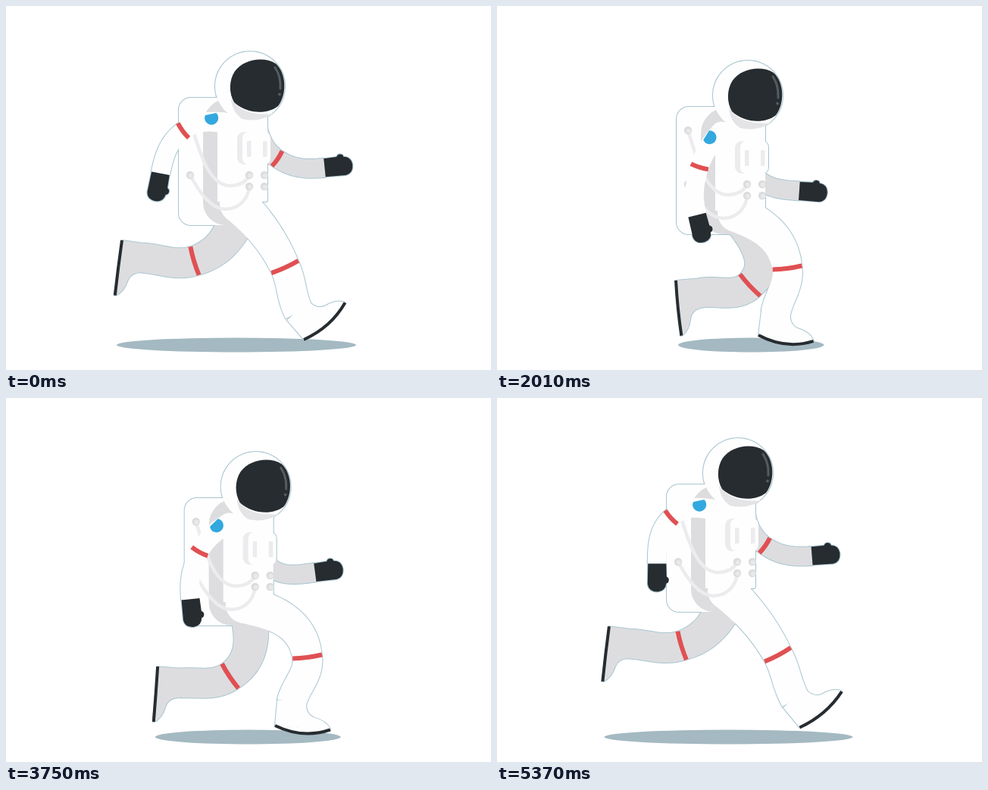
Recreate the animation shown at these times as an HTML page with a canvas. Size 640 by 480 pixels, loop 5400 ms.

```html
<!DOCTYPE html>
<html lang="en">
<head>
<meta charset="utf-8">
<title>Running astronaut</title>
<style>
html, body { margin: 0; width: 100%; height: 100%; overflow: hidden; background: #fff; }
canvas { display: block; }
</style>
</head>
<body>
<canvas id="stage" width="640" height="480"></canvas>
<script>
const ctx = document.getElementById('stage').getContext('2d');
const CYCLE = 1800, HALF = CYCLE / 2, STEP = 30, RAD = Math.PI / 180;
const WHITE = '#fefefe', GREY = '#dddde0', PALE = '#ececee', DARK = '#262c30',
      RED = '#e05052', BLUE = '#32a8df', EDGE = '#a9c5cf', SHADE = '#a4b9c2';
const SOLE = 73;

// Key poses: time first. Both legs share one stride and both arms one swing, half a cycle apart.
const BODY = [[0, 0, 0], [90, 5, 8], [210, 9, 12], [480, 0, -20], [640, -7, -65],
  [720, -8, -58], [870, -4, -7]];
// knee x, y; heel x, y; foot angle
const STRIDE = [
  [0, 368, 344, 393, 440, -41], [90, 405, 337, 364, 430, 2], [210, 383, 345, 345, 434, 7],
  [480, 285, 339, 190, 365, 56], [720, 224, 284, 131, 285, 93], [900, 249, 336, 153, 309, 98],
  [990, 262, 360, 170, 342, 100], [1110, 334, 368, 236, 362, 85],
  [1380, 393, 287, 371, 382, 17], [1620, 400, 268, 410, 366, -16]];
// upper arm angle, forearm angle
const SWING = [[0, 169, 118], [210, 122, 93], [480, 100, 75], [720, 74, 15], [900, 57, 11],
  [990, 74, 2], [1110, 91, 21], [1380, 129, 47], [1770, 169, 107]];

// Periodic cubic interpolation that never overshoots its keys.
function sample(keys, time, period = CYCLE) {
  const t = time % period, n = keys.length;
  const key = (i, c) => {
    const k = keys[(i + n) % n];
    return c ? k[c] : k[0] + Math.floor(i / n) * period;
  };
  let i = 0;
  while (i < n - 1 && keys[i + 1][0] <= t) i++;
  const span = j => key(j + 1, 0) - key(j, 0);
  const rate = (j, c) => (key(j + 1, c) - key(j, c)) / span(j);
  const slope = (j, c) => {
    const a = rate(j - 1, c), b = rate(j, c);
    if (a * b <= 0) return 0;
    const m = (a * span(j) + b * span(j - 1)) / (span(j) + span(j - 1));
    return Math.sign(m) * Math.min(Math.abs(m), 3 * Math.abs(a), 3 * Math.abs(b));
  };
  const h = span(i), s = (t - key(i, 0)) / h, r = 1 - s;
  return keys[0].slice(1).map((_, k) => {
    const c = k + 1;
    return r * r * (1 + 2 * s) * key(i, c) + s * s * (3 - 2 * s) * key(i + 1, c)
      + h * s * r * (r * slope(i, c) - s * slope(i + 1, c));
  });
}

const along = (p, angle, d) => [p[0] + d * Math.cos(angle * RAD), p[1] + d * Math.sin(angle * RAD)];
const mix = (a, b, s) => a.map((v, i) => v + (b[i] - v) * s);
const dist = (a, b) => Math.hypot(a[0] - b[0], a[1] - b[1]);
const heading = (a, b) => Math.atan2(b[1] - a[1], b[0] - a[0]) / RAD;
const turn = (a, b, s) => a + s * (((b - a + 900) % 360) - 180);

let edgePass = false;

function part(path, color) {
  if (edgePass) {
    ctx.strokeStyle = EDGE;
    ctx.lineWidth = 2;
    ctx.stroke(path);
  } else {
    ctx.fillStyle = color;
    ctx.fill(path);
  }
}

function line(path, color, width, cap = 'butt') {
  if (edgePass) return;
  ctx.strokeStyle = color;
  ctx.lineWidth = width;
  ctx.lineCap = cap;
  ctx.stroke(path);
}

function disc(x, y, r) {
  const p = new Path2D();
  p.arc(x, y, r, 0, 7);
  return p;
}

function box(x, y, w, h, r) {
  const p = new Path2D();
  p.roundRect(x, y, w, h, r);
  return p;
}

function at([x, y], angle, draw) {
  ctx.save();
  ctx.translate(x, y);
  ctx.rotate(angle * RAD);
  draw();
  ctx.restore();
}

// A bent tube of changing width through root, joint and end, with a red band at the joint.
function limb(root, joint, jointAngle, end, endAngle, widths, color) {
  const c2 = along(joint, jointAngle, -0.45 * dist(root, joint));
  const k = 0.38 * dist(joint, end);
  const curves = [
    [root, mix(root, c2, 0.45), c2, joint],
    [joint, along(joint, jointAngle, k), along(end, endAngle, -k), end]];
  const left = [], right = [];
  curves.forEach((q, n) => {
    for (let i = 0; i <= 14; i++) {
      const s = i / 14;
      const a = mix(q[0], q[1], s), b = mix(q[1], q[2], s), c = mix(q[2], q[3], s);
      const d = mix(a, b, s), e = mix(b, c, s), p = mix(d, e, s);
      const w = (widths[n] + (widths[n + 1] - widths[n]) * s) / 2;
      left.push(along(p, heading(d, e) + 90, w));
      right.unshift(along(p, heading(d, e) - 90, w));
    }
  });
  const path = new Path2D();
  left.concat(right).forEach(p => path.lineTo(p[0], p[1]));
  path.closePath();
  part(disc(root[0], root[1], widths[0] / 2), color);
  part(path, color);
  const half = widths[1] / 2;
  at(joint, jointAngle, () => line(new Path2D(`M0 ${-half}Q2 0 0 ${half}`), RED, 6));
}

const BOOT = new Path2D('M0 0L0 -34L38 -34Q39 -18 51 -15Q67 -12 73 -2L73 0Z');
const GLOVE = new Path2D('M0 -12L17 -12.5Q19 -16 22 -15.5Q26 -15 26 -12Q36 -11 37 -1Q37 11 27 12.5L0 12Z');

function legPose(phase) {
  const [kx, ky, hx, hy, foot] = sample(STRIDE, phase);
  const heel = [hx, hy], toe = along(heel, foot, SOLE);
  return { knee: [kx, ky], heel, toe, foot };
}

function leg({ knee, heel, toe, foot }, hip, color) {
  const ankle = along(along(heel, foot, 19), foot - 90, 32);
  const thigh = heading(hip, knee), shin = heading(knee, ankle);
  limb(hip, knee, turn(thigh, shin, 0.62), ankle, turn(shin, foot + 90, 0.4), [50, 39, 39], color);
  // The sole bends as the shoe nears the ground.
  const near = Math.min(1, Math.max(0, (Math.max(heel[1], toe[1]) - 400) / 40));
  const bow = 15 * near * Math.cos(foot * RAD);
  const sole = new Path2D(`M0 0Q38 ${bow} ${SOLE} -1`);
  at(heel, foot, () => {
    part(BOOT, color);
    if (!edgePass) part(sole, color);
    line(sole, DARK, 4);
  });
}

function arm(phase, shoulder, reach, color) {
  const [upper, fore] = sample(SWING, phase);
  const elbow = along(shoulder, upper, reach), wrist = along(elbow, fore, 64);
  limb(shoulder, elbow, (upper + fore) / 2, wrist, fore - 17, [27, 24, 25], color);
  at(wrist, fore - 17, () => part(GLOVE, DARK));
  return upper;
}

function patch(shoulder, upper) {
  if (edgePass) return;
  const p = new Path2D();
  p.arc(0, 0, 9, 0.95, 2 * Math.PI - 0.95);
  at(along(shoulder, upper + 33, 17), upper + 90, () => part(p, BLUE));
}

function pack() {
  part(box(228, 121, 100, 168, 16), WHITE);
  part(box(260, 122, 74, 167, [34, 10, 24, 30]), GREY);
}

function knob(x, y) {
  if (edgePass) return;
  part(disc(x, y, 5.2), '#dcdcde');
  part(disc(x + 0.8, y + 0.8, 3), '#e9e9eb');
}

function chest() {
  part(box(279, 141, 66, 117, [14, 6, 2, 0]), WHITE);
  if (edgePass) return part(box(312, 166, 37, 43, 8), WHITE);
  line(new Path2D('M243 152C256 195 268 238 297 237C312 236 318 230 321 223'), PALE, 4.5);
  line(new Path2D('M243 223C255 245 270 268 290 268C312 267 320 250 321 238'), PALE, 4.5);
  for (const y of [152, 223]) knob(243, y);
  part(box(305, 166, 40, 43, 9), PALE);
  part(box(312, 166, 37, 43, 8), WHITE);
  for (const x of [318, 339]) part(box(x, 178, 5.5, 21, 1), PALE);
  for (const x of [321, 341]) for (const y of [223, 238]) knob(x, y);
}

function helmet() {
  part(disc(322, 106, 46), WHITE);
  if (edgePass) return;
  part(new Path2D('M297 122Q312 146 353 142Q334 154 312 149Q298 140 297 122Z'), '#e4e4e7');
  part(new Path2D('M302 86C314 70 340 66 356 76C370 89 371 116 359 132C344 144 317 142 301 127C294 115 294 98 302 86Z'), DARK);
  line(new Path2D('M355 81Q363 93 362 109'), '#555c60', 3, 'round');
  part(disc(361, 116.5, 1.9), '#555c60');
}

function shadow(legs) {
  const xs = legs.flatMap(l => [l.heel[0], l.toe[0]]);
  const left = Math.min(...xs) + 3, right = Math.max(...xs) + 14;
  ctx.fillStyle = SHADE;
  ctx.beginPath();
  ctx.ellipse((left + right) / 2, 447, (right - left) / 2, 9.5, 0, 0, 7);
  ctx.fill();
}

function astronaut(t, nearLeg, farLeg) {
  const [dx, dy] = sample(BODY, t, HALF);
  const onBody = draw => at([dx, dy], 0, draw);
  const shoulder = [287, 154];
  onBody(() => arm(t + HALF, [331, 160], 49, GREY));
  leg(farLeg, [311 + dx, 264 + dy], GREY);
  onBody(pack);
  leg(nearLeg, [307 + dx, 261 + dy], WHITE);
  onBody(() => {
    chest();
    patch(shoulder, arm(t, shoulder, 54, WHITE));
    helmet();
  });
}

function render(t) {
  ctx.fillStyle = '#fff';
  ctx.fillRect(0, 0, 640, 480);
  const legs = [legPose(t), legPose(t + HALF)];
  shadow(legs);
  for (edgePass of [true, false]) astronaut(t, ...legs);
}

const start = performance.now();
function tick() {
  const ms = performance.now() - start;
  render(Math.floor(ms / STEP) * STEP % CYCLE);
  requestAnimationFrame(tick);
}
tick();
</script>
</body>
</html>
```
